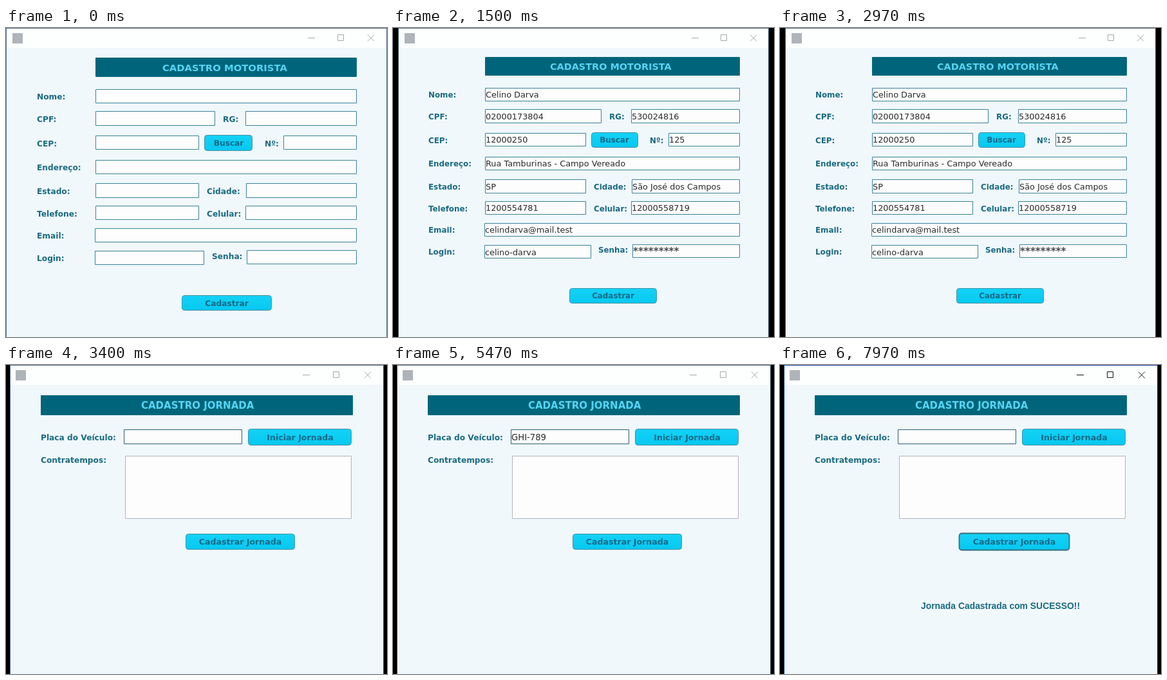
Write an HTML page with a canvas that moves like this. It is 592 by 480 pixels and loops after 8000 ms.

```html
<!DOCTYPE html>
<html lang="pt-BR">
<head>
<meta charset="utf-8">
<style>
  html, body { margin: 0; width: 100%; height: 100%; overflow: hidden; background: #000; }
  canvas { display: block; }
</style>
</head>
<body>
<canvas id="stage" width="592" height="480"></canvas>
<script>
const ctx = document.getElementById('stage').getContext('2d');
const LOOP = 8000;
const FILL_FORM = 1300, OPEN_TRIP = 3400, TYPE_PLATE = 4830, SAVE_TRIP = 6270;
const BOLD = 'bold 12.2px', PLAIN = '13.2px';
const INK = '#1a6a80', LINE = '#3a8298', WHITE = '#fdfdfd';

// x, y, right, bottom, value
const formFields = [
  [139, 95, 545, 117, 'Celino Darva'],
  [139, 129, 325, 152, '02000173804'],
  [372, 129, 545, 152, '530024816'],
  [139, 167, 300, 189, '12000250'],
  [431, 167, 545, 189, '125'],
  [139, 205, 545, 227, 'Rua Tamburinas - Campo Vereado'],
  [139, 241, 300, 264, 'SP'],
  [373, 241, 545, 264, 'São José dos Campos'],
  [139, 276, 300, 298, '1200554781'],
  [372, 276, 545, 298, '12000558719'],
  [138, 311, 545, 333, 'celindarva@mail.test'],
  [138, 346, 308, 368, 'celino-darva'],
  [374, 345, 545, 367, '']
];
// text, x, middle
const formLabels = [
  ['Nome:', 48, 106], ['CPF:', 48, 141], ['RG:', 337, 141], ['CEP:', 48, 179],
  ['Nº:', 402, 179], ['Endereço:', 48, 216], ['Estado:', 48, 253], ['Cidade:', 312, 253],
  ['Telefone:', 48, 288], ['Celular:', 312, 288], ['Email:', 48, 322],
  ['Login:', 48, 357], ['Senha:', 320, 354]
];

let scale = 1, shift = 0;
const px = x => Math.round(x * scale + shift);
const py = y => Math.round(y * scale);

function text(str, x, baseline, font, color, align = 'left') {
  const [, weight, size] = font.match(/(bold )?([\d.]+)px/);
  const family = font.includes('Liberation') ? '"Liberation Sans", sans-serif' : '"DejaVu Sans", sans-serif';
  ctx.font = `${weight || ''}${size * scale}px ${family}`;
  ctx.fillStyle = color;
  ctx.textAlign = align;
  ctx.fillText(str, px(x), py(baseline));
}

function box(x, y, right, bottom, fill, stroke, radius = 0, width = 1) {
  const left = px(x), top = py(y);
  ctx.beginPath();
  ctx.roundRect(left + .5, top + .5, px(right) - left - 1, py(bottom) - top - 1, radius);
  ctx.fillStyle = fill;
  ctx.fill();
  ctx.strokeStyle = stroke;
  ctx.lineWidth = width;
  ctx.stroke();
}

function field(x, y, right, bottom, value, stroke = LINE) {
  box(x, y, right, bottom, WHITE, stroke);
  text(value, x + 1, (y + bottom) / 2 + 5, PLAIN, '#2a2a2e');
}

function button(x, y, right, bottom, label, font = BOLD, focused = false) {
  const grow = focused ? 1 : 0;
  const shade = ctx.createLinearGradient(0, py(y), 0, py(bottom));
  shade.addColorStop(0, '#14d2f6');
  shade.addColorStop(1, '#06c8f0');
  box(x - grow, y - grow, right + grow, bottom + grow, shade, focused ? '#34707e' : '#4a90a0', 4, 1 + grow * .8);
  text(label, (x + right) / 2, (y + bottom) / 2 + 4.5, font, '#106a88', 'center');
}

function header(title, x, y, right, bottom, textX, size) {
  box(x, y, right, bottom, '#00657a', '#00657a');
  text(title, textX, y + 21, `bold ${size}px`, '#56d4f4');
}

function windowFrame(left, right, icon, controls, active) {
  const l = px(left), r = px(right);
  ctx.fillStyle = '#f0f8fc';
  ctx.fillRect(l, 0, r - l, 480);
  ctx.fillStyle = '#fdfefe';
  ctx.fillRect(l, 0, r - l, 31);
  ctx.fillStyle = active ? '#1c48b0' : '#587086';
  ctx.fillRect(l, 0, r - l, 1);
  ctx.fillRect(l, 0, 1, 480);
  ctx.fillRect(r - 1, 0, 1, 480);
  ctx.fillStyle = '#aeb4ba';
  ctx.fillRect(px(icon), 8, 16, 16);

  const [min, max, close] = controls.map(px);
  ctx.strokeStyle = active ? '#111' : '#a6a6a6';
  ctx.lineWidth = 1;
  ctx.beginPath();
  ctx.moveTo(min - 5, 15.5);
  ctx.lineTo(min + 6, 15.5);
  ctx.rect(max - 4.5, 10.5, 9, 9);
  ctx.moveTo(close - 5, 10.5);
  ctx.lineTo(close + 5, 20.5);
  ctx.moveTo(close + 5, 10.5);
  ctx.lineTo(close - 5, 20.5);
  ctx.stroke();
}

function driverForm(filled) {
  scale = filled ? .974 : 1;
  shift = filled ? 7.8 : 0;
  windowFrame(0, 592, 10, [474, 520, 567], false);
  header('CADASTRO MOTORISTA', 139, 46, 545, 76, 243, 14.8);
  for (const [label, x, middle] of formLabels) text(label, x, middle + 4.5, BOLD, INK);
  for (const [x, y, right, bottom, value] of formFields) field(x, y, right, bottom, filled ? value : '');
  if (filled) text('*********', 375, 361, 'bold 15.6px', '#4a4a52');
  button(308, 166, 383, 191, 'Buscar');
  button(273, 415, 413, 439, 'Cadastrar');
}

function tripForm(plate, saved) {
  scale = 1;
  shift = 0;
  windowFrame(6, 587, 15, [466, 513, 562], saved);
  header('CADASTRO JORNADA', 54, 47, 539, 78, 210, 15);
  text('Placa do Veículo:', 54, 117, BOLD, INK);
  text('Contratempos:', 54, 152, BOLD, INK);
  field(183, 100, 367, 123, plate, '#2c5f78');
  box(185, 141, 537, 239, WHITE, '#b2b4bc');
  button(376, 99, 537, 125, 'Iniciar Jornada', 'bold 12.6px');
  button(279, 262, 449, 287, 'Cadastrar Jornada', 'bold 12.6px', saved);
  if (saved) text('Jornada Cadastrada com SUCESSO!!', 219, 379, 'bold 13.9px Liberation', INK);
}

function draw() {
  const t = performance.now() % LOOP;
  ctx.fillStyle = '#000';
  ctx.fillRect(0, 0, 592, 480);
  if (t < OPEN_TRIP) driverForm(t >= FILL_FORM);
  else tripForm(t >= TYPE_PLATE && t < SAVE_TRIP ? 'GHI-789' : '', t >= SAVE_TRIP);
  requestAnimationFrame(draw);
}
draw();
</script>
</body>
</html>
```
